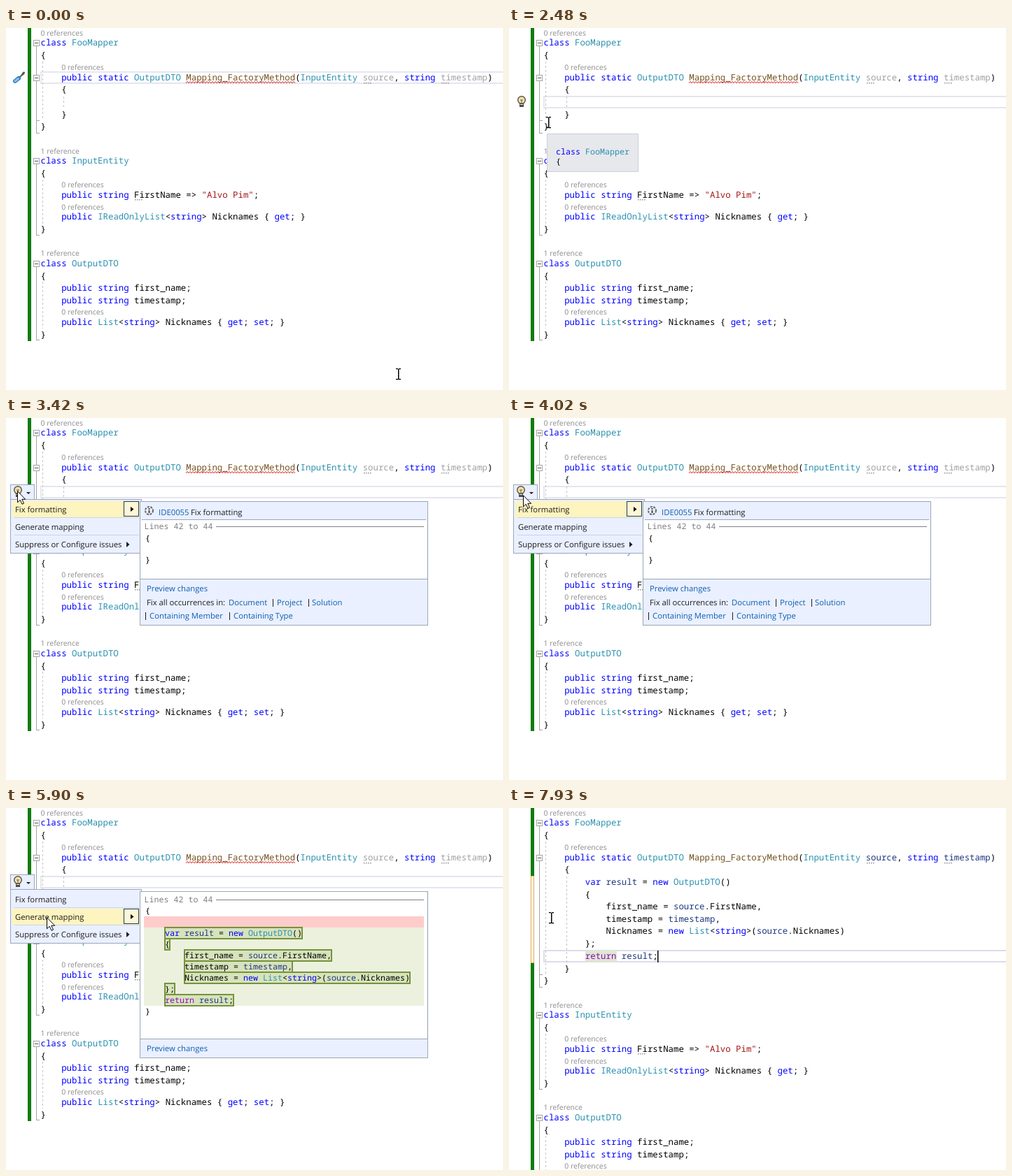
Write an HTML page with a canvas that moves like this. It is 710 px wide and 518 px high and loops after 8 s.

```html
<!DOCTYPE html>
<html lang="en">
<head>
<meta charset="utf-8">
<style>
html, body { margin: 0; width: 100%; height: 100%; overflow: hidden; background: #fff; }
canvas { display: block; }
</style>
</head>
<body>
<canvas id="stage" width="710" height="518"></canvas>
<script>
const ctx = document.getElementById('stage').getContext('2d');
const LOOP = 8000, SHIFT = 106;
const CODE = 12.37, SMALL = 11.667, LEFT = 49.5;
const BLUE = '#0000ff', LOCAL = '#1f377f', FADED = '#a0a0a5', GREY = '#a5a5a5';
const PANEL = '#eaf0ff', EDGE = '#9ba7b7', LINK = '#0e5fb0', HOVER = '#fdf4bf';

// Each row: vertical centre, text. Rows starting with a digit are reference hints.
const top_ = [
  [7, '0 references'], [21, 'class FooMapper'], [39, '{'], [56, '    0 references'],
  [71, '    public static OutputDTO Mapping_FactoryMethod(InputEntity source, string timestamp)'],
  [88, '    {']
];
const bottom = [
  [124, '    }'], [141, '}'],
  [176, '1 reference'], [189.5, 'class InputEntity'], [208, '{'],
  [224, '    0 references'], [238.5, '    public string FirstName => "Alvo Pim";'],
  [256, '    0 references'], [269.5, '    public IReadOnlyList<string> Nicknames { get; }'], [288, '}'],
  [322, '1 reference'], [336.5, 'class OutputDTO'], [354.5, '{'],
  [371.5, '    public string first_name;'], [389.5, '    public string timestamp;'],
  [406, '    0 references'], [420.5, '    public List<string> Nicknames { get; set; }'], [438.5, '}']
];
const body = [
  'var result = new OutputDTO()', '{', '    first_name = source.FirstName,',
  '    timestamp = timestamp,', '    Nicknames = new List<string>(source.Nicknames)',
  '};', 'return result;'
];

// Pointer stops: time, x, y, kind
const stops = [
  [0, 560, 495, 'beam'], [140, 480, 427, 'beam'], [290, 295, 270, 'beam'],
  [450, 150, 144, 'beam'], [600, 113, 111, 'beam'],
  [1220, 107, 114, 'beam'], [1370, 83, 124, 'beam'], [1530, 61, 133, 'beam'], [1680, 56, 135, 'beam'],
  [2790, 31, 118, 'arrow'], [2940, 16, 104, 'arrow'],
  [3880, 20, 110, 'arrow'], [4030, 34, 124, 'arrow'], [4190, 50, 143, 'arrow'],
  [4340, 57, 153, 'arrow'], [4500, 58, 156, 'arrow'], [7470, 60, 157, 'beam']
];

function rect(x, y, w, h, color) {
  ctx.fillStyle = color;
  ctx.fillRect(x, y, w, h);
}

function frame(x, y, w, h, fill, edge, line = 1) {
  rect(x, y, w, h, edge);
  rect(x + line, y + line, w - 2 * line, h - 2 * line, fill);
}

function shape(points, fill, stroke) {
  ctx.beginPath();
  points.forEach(([x, y]) => ctx.lineTo(x, y));
  ctx.closePath();
  if (fill) { ctx.fillStyle = fill; ctx.fill(); }
  if (stroke) { ctx.strokeStyle = stroke; ctx.lineWidth = 1; ctx.stroke(); }
}

function disc(x, y, r, fill) {
  ctx.beginPath();
  ctx.arc(x, y, r, 0, 7);
  ctx.fillStyle = fill;
  ctx.fill();
}

function segment(x1, y1, x2, y2, color, width = 1) {
  ctx.beginPath();
  ctx.moveTo(x1, y1);
  ctx.lineTo(x2, y2);
  ctx.strokeStyle = color;
  ctx.lineWidth = width;
  ctx.stroke();
}

function label(text, x, y, color = '#1e1e1e', size = 11.3) {
  ctx.font = size + 'px "Open Sans", "Noto Sans", sans-serif';
  ctx.fillStyle = color;
  ctx.fillText(text, x, y + 4);
}

function tint(word, rest, local) {
  if (/^(class|public|static|string|get|set|var|new)$/.test(word)) return BLUE;
  if (/^(FooMapper|InputEntity|OutputDTO|IReadOnlyList|List)$/.test(word)) return '#2b91af';
  if (word === 'return') return '#8f08c4';
  if (word === 'Mapping_FactoryMethod') return '#74531f';
  if (word[0] === '"') return '#a31515';
  if (word === 'result') return LOCAL;
  if (word === 'source' || word === 'timestamp' && /^[,)]/.test(rest)) return local;
  return '#000';
}

function code(text, x, y, size = CODE, local = LOCAL) {
  ctx.font = size + 'px "Noto Sans Mono", "DejaVu Sans Mono", monospace';
  for (const { 0: word, index } of text.matchAll(/"[^"]*"|\w+|[^\w\s"]+/g)) {
    ctx.fillStyle = tint(word, text.slice(index + word.length), local);
    ctx.fillText(word, x + index * size * 0.6, y + 4);
  }
}

function rows(list, dy, local) {
  for (const [y, text] of list) {
    const hint = text.trim();
    if (/^\d/.test(hint)) label(hint, LEFT + (text.length - hint.length) * 7.42, y + dy, '#8c8c8c', 10.5);
    else code(text, LEFT, y + dy, CODE, local);
  }
}

function guide(x, from, to) {
  ctx.setLineDash([3, 3]);
  segment(x, from, x, to, '#c4c4c4');
  ctx.setLineDash([]);
}

function outline(y, end) {
  rect(43, y, 1, end - y, GREY);
  rect(43, end, 5, 1, GREY);
}

function fold(y) {
  frame(39, y - 4, 9, 9, '#fff', GREY);
  rect(41, y, 5, 1, '#555');
}

function dots(x, y) {
  for (let i = 0; i < 4; i++) rect(x + i * 3, y, 1.5, 1.5, '#909090');
}

function squiggle() {
  ctx.beginPath();
  for (let x = 257; x <= 413; x += 2) ctx.lineTo(x, x % 4 === 1 ? 79 : 76.5);
  ctx.strokeStyle = '#e0302a';
  ctx.lineWidth = 1;
  ctx.stroke();
}

function screwdriver() {
  ctx.lineCap = 'round';
  segment(18, 72, 25, 65, '#555', 2);
  segment(24, 66, 25.5, 64, '#555', 3);
  segment(13, 76, 18, 72, '#2f7fc4', 6);
  segment(13, 76, 17.5, 72.5, '#8cc0ea', 3);
  ctx.lineCap = 'butt';
}

function bulb(x, y) {
  disc(x, y - 2, 6, '#5a5344');
  disc(x, y - 2, 4.6, '#f3dfae');
  rect(x - 3, y + 3, 6, 5, '#4a4a4a');
  rect(x - 2, y + 4, 4, 1, '#fff');
  segment(x, y - 2, x, y + 3, '#6b6250');
  segment(x - 2, y - 2, x + 2, y - 2, '#6b6250');
}

function editor(t) {
  const done = t >= 7620, checked = t >= 7930, dy = done ? SHIFT : 0;
  const line = done ? 212 : t < 1070 ? 71 : 106;
  const hilite = done ? '#dcdcea' : '#e6e6f0';
  frame(49, line - 9, 670, 18, '#fff', hilite, 2);

  rect(31, 0, 5, 448 + dy, '#107c10');
  if (done) frame(31, 97, 5, 125, '#fff', '#dfa94e');

  outline(26, 150 + dy);
  rect(43, 132 + dy, 5, 1, GREY);
  outline(194 + dy, 296 + dy);
  outline(341 + dy, 446 + dy);
  [21, 71, 190 + dy, 337 + dy].forEach(fold);
  guide(52.5, 48, 132 + dy);
  guide(82.5, 98, 116 + dy);
  guide(52.5, 217 + dy, 280 + dy);
  guide(52.5, 363 + dy, 430 + dy);

  if (done) rect(109, 204, 45, 16, '#dfe8cf');
  rows(top_, 0, checked ? LOCAL : FADED);
  rows(bottom, dy, LOCAL);
  if (done) body.forEach((text, i) => code(text, LEFT + 8 * 7.42, 106 + i * 17.6, CODE));
  if (!checked) squiggle();
  dots(511, 78);
  dots(622, 78);
  dots(184, 245 + dy);

  const caret = t >= 1070 && t < 1530 || t >= 2000 && t < 2480;
  if (caret) rect(109, 97, 1, 18, '#000');
  if (done) rect(212, 204, 1.5, 17, '#000');

  if (t < 1070) screwdriver();
  if (t >= 2480 && t < 2940) bulb(18, 105);
}

function tooltip() {
  frame(54, 151, 131, 55, '#e7e8ec', '#cccedb');
  code('class FooMapper', 67, 177, SMALL);
  code('{', 67, 191, SMALL);
}

function menu(second, arrow) {
  frame(6, 116, 188, 78, PANEL, EDGE);
  rect(12, 142, 178, 1, '#cbd3e3');
  rect(12, 167, 178, 1, '#cbd3e3');
  const y = second ? 144 : 119;
  rect(9, y, 182, 23, HOVER);
  if (arrow) {
    frame(168, y, 22, 22, '#fdf7d6', '#1e395b');
    shape([[178, y + 8], [182.5, y + 11.5], [178, y + 15]], '#000');
  }
  label('Fix formatting', 13, 131);
  label('Generate mapping', 13, 156);
  label('Suppress or Configure issues', 13, 181);
  shape([[172, 177], [176.5, 181], [172, 185]], '#1e1e1e');
}

function previewHead(y) {
  ctx.font = SMALL + 'px "Noto Sans Mono", "DejaVu Sans Mono", monospace';
  ctx.fillStyle = '#808080';
  ctx.fillText('Lines 42 to 44', 197.5, y + 4);
  rect(300, y, 297, 1, '#808080');
}

function fixPreview() {
  frame(191, 119, 412, 178, PANEL, EDGE);
  rect(192, 146, 409, 84, '#fff');
  rect(194, 145, 406, 1, EDGE);
  rect(192, 230, 410, 1, EDGE);
  ctx.setLineDash([3, 1.5]);
  ctx.beginPath();
  ctx.arc(204.5, 132.5, 5.5, 0, 7);
  ctx.strokeStyle = '#666';
  ctx.lineWidth = 2;
  ctx.stroke();
  ctx.setLineDash([]);
  rect(203.5, 129, 2, 2, '#444');
  rect(203.5, 132, 2, 4, '#444');
  label('IDE0055', 218, 135, LINK);
  label('Fix formatting', 264, 135);
  previewHead(155);
  code('{', 199, 172, SMALL);
  code('}', 199, 203, SMALL);
  label('Preview changes', 201, 244, LINK);
  label('Fix all occurrences in:', 201, 264);
  label('Document', 318, 264, LINK);
  label('Project', 387, 264, LINK);
  label('Solution', 437, 264, LINK);
  label('Containing Member', 205, 283, LINK);
  label('Containing Type', 325, 283, LINK);
  [[380, 264], [431, 264], [198, 283], [318, 283]].forEach(([x, y]) => rect(x + 1, y - 5, 1, 11, '#1e1e1e'));
}

function mappingPreview() {
  frame(191, 119, 412, 239, PANEL, EDGE);
  rect(192, 120, 409, 211, '#fff');
  rect(192, 330, 410, 1, EDGE);
  previewHead(131);
  code('{', 199, 147, SMALL);
  rect(197, 155, 400, 16, '#ffcccc');
  rect(197, 171, 400, 112, '#ebf1dd');
  body.forEach((text, i) => {
    const indent = text.search(/\S/), x = 226 + indent * 7;
    frame(x, 170 + i * 16, (text.length - indent) * 7 + 2, 18, '#d7e3bc', '#76923c', 2);
  });
  body.forEach((text, i) => code(text, 227, 179 + i * 16, SMALL));
  code('}', 199, 291, SMALL);
  label('Preview changes', 201, 344, LINK);
}

function pointer(x, y, kind) {
  if (kind === 'arrow') {
    const tip = [[0, 0], [0, 16], [3.7, 12.5], [6.5, 18.5], [9, 17.4], [6.3, 11.5], [11.2, 11.5]];
    shape(tip.map(([a, b]) => [x + a + 0.5, y + b + 0.8]), '#fff', '#000');
    return;
  }
  rect(x, y - 7, 1.5, 15, '#000');
  for (const end of [y - 8, y + 7]) {
    rect(x - 3, end, 3, 1.3, '#000');
    rect(x + 1, end, 3, 1.3, '#000');
  }
}

function draw(t) {
  const within = (from, to) => t >= from && t < to;
  rect(0, 0, 710, 518, '#fff');
  editor(t);
  if (within(1840, 2790)) tooltip();
  if (within(2940, 7470)) {
    frame(6, 95, 35, 22, PANEL, EDGE);
    bulb(17, 105);
    shape([[29, 106], [35, 106], [32, 109]], '#1e1e1e');
  }
  if (within(3420, 7470)) menu(t >= 4190, t < 4190 || t >= 4970);
  if (within(3420, 4190)) fixPreview();
  if (within(5120, 7470)) mappingPreview();

  const [, x, y, kind] = stops.findLast(stop => stop[0] <= t);
  const click = within(910, 1220) || within(3270, 3420) || within(7310, 7470);
  if (click) disc(x, y, 11.5, 'rgba(250, 236, 0, 0.82)');
  pointer(x, y, kind);
}

ctx.textRendering = 'geometricPrecision';
function tick() {
  draw(performance.now() % LOOP);
  requestAnimationFrame(tick);
}
tick();
</script>
</body>
</html>
```
